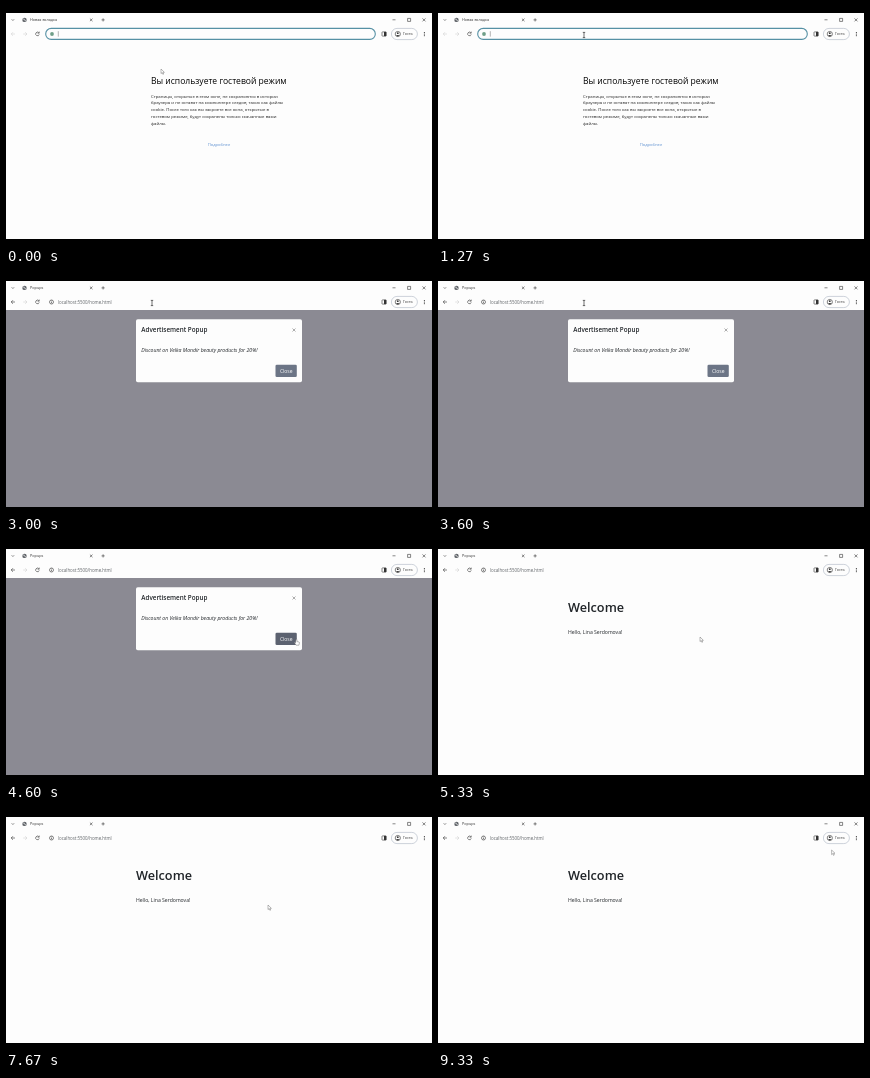
These frames come from a looping animation (426x240 px, 9.39 s). An HTML page:

```html
<!DOCTYPE html>
<html lang="ru">
<head>
<meta charset="utf-8">
<title>Popups</title>
<style>
  html, body { margin: 0; height: 100%; overflow: hidden; background: #000; }
  svg { display: block; width: 100vw; height: 100vh; font: 4.3px "Open Sans", "Noto Sans", sans-serif; }
  .line { fill: none; stroke: #333; stroke-width: .6; }
  .dim { stroke: #d0d0d0; }
  .ui { font-size: 3.8px; }
  .url { font-size: 4.4px; fill: #606468; }
  .page { font-size: 5.1px; fill: #212529; }
</style>
</head>
<body>
<svg viewBox="0 0 426 240">
  <defs>
    <g id="globe">
      <circle r="2.2" fill="#5f6368"/>
      <path d="M-1.6-.6Q0-1.6 .2 0T1.5 .8" fill="none" stroke="#fff" stroke-width=".6"/>
    </g>
  </defs>
  <rect width="426" height="240"/>
  <rect y="7" width="426" height="226" fill="#fdfdfd"/>

  <g id="guest" fill="#222">
    <text x="145" y="77.8" font-size="8.55" fill="#000">Вы используете гостевой режим</text>
    <text x="145" y="91.6">Страницы, открытые в этом окне, не сохраняются в истории</text>
    <text x="145" y="98.4">браузера и не оставят на компьютере следов, таких как файлы</text>
    <text x="145" y="105.2">cookie. После того как вы закроете все окна, открытые в</text>
    <text x="145" y="112">гостевом режиме, будут сохранены только скачанные вами</text>
    <text x="145" y="118.8">файлы.</text>
    <text x="213" y="139.6" font-size="4.1" text-anchor="middle" fill="#5b8fd0">Подробнее</text>
  </g>

  <g id="welcome" class="page">
    <text x="130" y="69.7" font-size="12.7" font-weight="600">Welcome</text>
    <text x="130" y="91.8">Hello, Lina Serdomova!</text>
  </g>

  <rect id="backdrop" y="36" width="426" height="197" fill="#8b8a93"/>
  <g id="modal" class="page">
    <rect x="130" y="45.3" width="166" height="63" rx="1.8" fill="#fdfdfd"/>
    <text x="135.3" y="58.2" font-size="6.3" font-weight="600">Advertisement Popup</text>
    <path class="line" d="M286.5 54.5l3 3m0-3l-3 3" style="stroke:#777"/>
    <text x="135.3" y="77.6" font-size="5.15" font-style="italic">Discount on Velka Mondir beauty products for 20%!</text>
    <rect id="button" x="269.5" y="90.8" width="21.3" height="12.2" rx="1.3"/>
    <text x="280.2" y="98.7" font-size="5" text-anchor="middle" fill="#fff">Close</text>
  </g>

  <!-- tab strip -->
  <path class="line" d="M5.7 13.3l1.2 1.2 1.2-1.2M83.9 12.6l2.6 2.6m0-2.6l-2.6 2.6M95.5 13.9h3.2m-1.6-1.6v3.2M386.5 13.8h3M401.6 12.4h3v3h-3zM416.5 12.4l3 3m0-3l-3 3"/>
  <use href="#globe" x="18.5" y="13.9"/>
  <text id="tab" class="ui" x="24" y="15.4" fill="#333"></text>

  <!-- toolbar -->
  <path id="back" class="line" d="M9 28h-3.8m1.8-1.8l-1.8 1.8 1.8 1.8"/>
  <path class="line dim" d="M17.2 28h3.8m-1.8-1.8l1.8 1.8-1.8 1.8"/>
  <path class="line" d="M32.7 26.6a1.8 1.8 0 1 0 .5 1.8M33.2 25.6v1.6h-1.6"/>
  <rect class="line" x="376" y="25.9" width="4.2" height="4.2" rx=".5"/>
  <rect x="378" y="25.9" width="2.2" height="4.2" fill="#333"/>
  <rect x="385.4" y="22.4" width="26" height="11.2" rx="5.6" fill="#fdfdfd" stroke="#b9c0cc" stroke-width=".7"/>
  <circle class="line" cx="391.8" cy="28" r="2.6"/>
  <path d="M390 29.5q1.8-1.2 3.6 0l-1.8 1z" fill="#333"/>
  <circle cx="391.8" cy="27.2" r=".9" fill="#333"/>
  <text class="ui" x="397" y="29.4" fill="#333">Гость</text>
  <path d="M418.4 26v4.2" stroke="#333" stroke-width=".9" stroke-dasharray="1 .6"/>

  <g id="focus">
    <rect x="39.7" y="22.4" width="329.6" height="11" rx="5.5" fill="#fdfdfd" stroke="#5590a4" stroke-width="1.1"/>
    <circle cx="46" cy="28" r="1.9" fill="#6f9f88"/>
    <path id="caret" d="M52.3 25.2v5.4" stroke="#444" stroke-width=".4"/>
  </g>

  <g id="suggest">
    <rect x="38" y="21.5" width="332" height="44.5" rx="3" fill="#fdfdfd"/>
    <path d="M46 66H362" stroke="#e8e8e4" stroke-width=".8"/>
    <use href="#globe" x="47.5" y="28"/>
    <use href="#globe" x="47.5" y="42"/>
    <rect x="38" y="36" width="1.6" height="12" fill="#2d64c8"/>
    <text class="url" x="57" y="29.4">http://localhost:5500/home.html</text>
    <text x="57" y="43.6" font-weight="700" fill="#2459b8">http://localhost:5500/home.html</text>
    <circle class="line" cx="47" cy="54.6" r="1.4"/>
    <path class="line" d="M48 55.6l1.6 1.6"/>
    <text class="url" x="57" y="56.9">http://localhost:5500/home.html <tspan fill="#93a4bd">- Поиск Vundel</tspan></text>
  </g>

  <g id="address">
    <circle class="line" cx="45.5" cy="28" r="2"/>
    <path class="line" d="M45.5 27.7v1.5m0-2.6v.6"/>
    <text class="url" x="52" y="29.5">localhost:5500/home.html</text>
  </g>

  <g id="cursor" fill="#fff" stroke="#555" stroke-width=".4">
    <path id="arrow" d="M0 0v4.6l1.1-1 .8 1.8.8-.4-.8-1.7h1.5z"/>
    <path id="beam" d="M-1.2-2.6h2.4M0-2.6v5.2M-1.2 2.6h2.4" stroke="#333" stroke-width=".7"/>
    <path id="hand" d="M-.5-2.4q.5-.6 1 0v2l2 .4q.6.3.4 1.2l-.5 2h-2.8l-1.6-2.4q.3-.8 1.1-.1z"/>
  </g>
</svg>
<script>
const LOOP = 9390, PASTE = 1800, LOAD = 2600, OPEN = 2660, CLOSE = 4640;
// Pointer stops: time, x, y
const stops = [
  [400, 155, 63], [1200, 146, 29], [3700, 146, 29], [4350, 290.5, 100],
  [4800, 290.5, 100], [5270, 262, 95], [8500, 262, 95], [9250, 393.6, 40]
];
const $ = id => document.getElementById(id);
const show = (id, on) => $(id).style.display = on ? '' : 'none';
const ramp = (t, start, length) => Math.min(1, Math.max(0, (t - start) / length));
const ease = p => p * p * (3 - 2 * p);
const easeOut = p => 1 - (1 - p) ** 2;

function pointerAt(t) {
  let [, x, y] = stops[0];
  for (let i = 1; i < stops.length; i++) {
    const [start, x0, y0] = stops[i - 1], [end, x1, y1] = stops[i];
    if (t < start) break;
    const p = ease(ramp(t, start, end - start));
    x = x0 + (x1 - x0) * p;
    y = y0 + (y1 - y0) * p;
  }
  return [x, y];
}

function draw(time) {
  const t = Math.floor(time % LOOP * .015 + .06) / .015;
  const loaded = t >= LOAD;
  show('guest', !loaded);
  show('focus', t < PASTE);
  show('caret', t % 1000 < 500);
  show('suggest', t >= PASTE && !loaded);
  show('address', loaded);
  show('welcome', loaded);
  $('tab').textContent = loaded ? 'Popups' : 'Новая вкладка';
  $('back').classList.toggle('dim', !loaded);

  // The box slides and fades; the backdrop leaves after it
  const slide = easeOut(ramp(t, OPEN, 300)) - easeOut(ramp(t, CLOSE, 200));
  $('backdrop').style.opacity = ramp(t, OPEN, 150) - ramp(t, CLOSE + 200, 150);
  $('modal').style.opacity = ramp(t, OPEN, 150) - ramp(t, CLOSE, 150);
  $('modal').setAttribute('transform', `translate(0 ${-14 * (1 - slide)})`);

  const [x, y] = pointerAt(t);
  const hand = t >= OPEN && t < CLOSE + 200 && x > 269 && x < 292 && y > 90 && y < 104;
  const beam = x > 39 && x < 370 && y > 21 && y < 35;
  $('button').setAttribute('fill', hand ? '#5c6270' : '#6c7586');
  show('hand', hand);
  show('beam', beam);
  show('arrow', !hand && !beam);
  $('cursor').setAttribute('transform', `translate(${x} ${y})`);
  requestAnimationFrame(() => draw(performance.now()));
}
draw(0);
</script>
</body>
</html>
```
